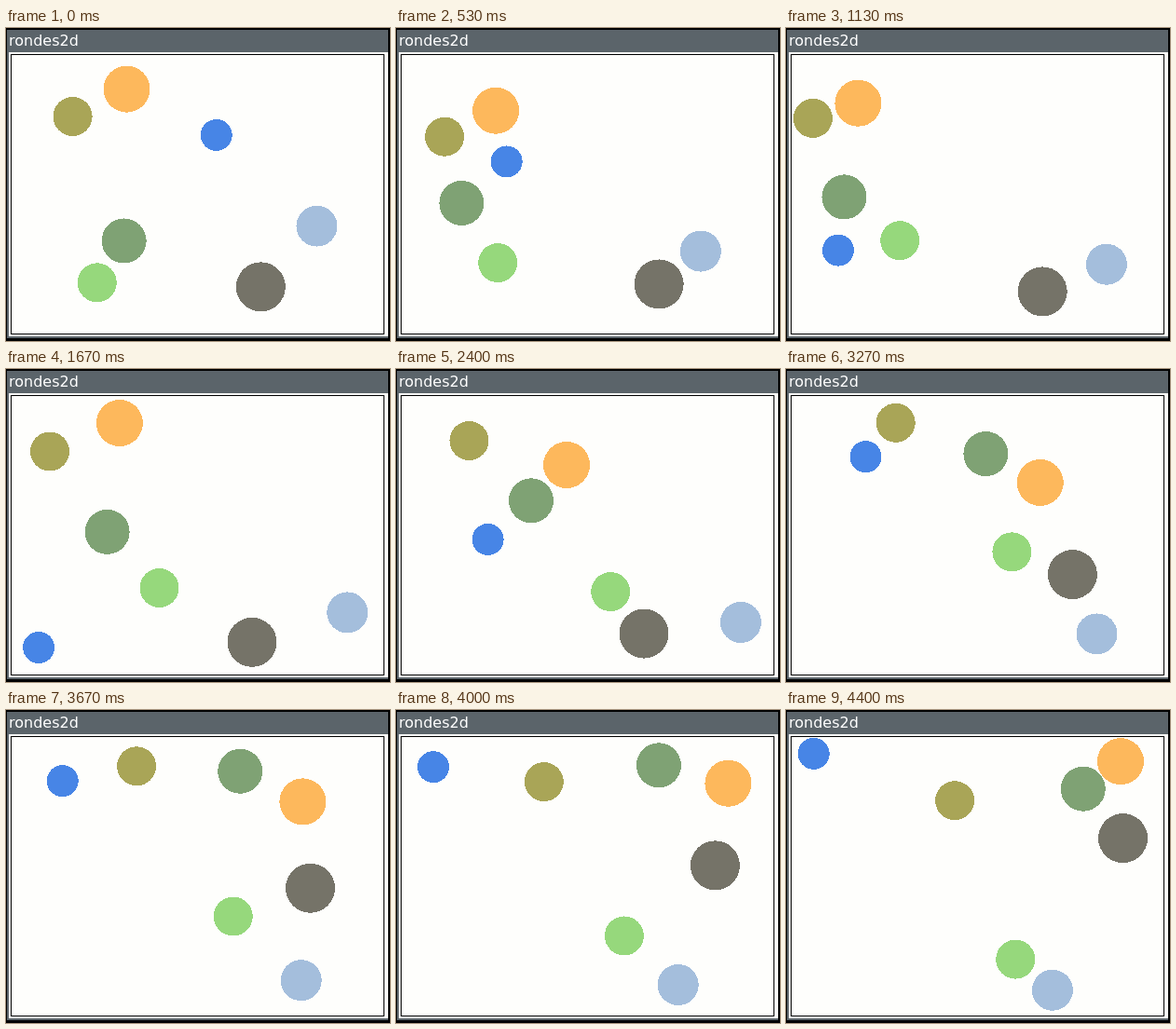
An HTML page for the animation above (4470 ms loop, 412 by 336 pixels).

```html
<!DOCTYPE html>
<html lang="fr">
<head>
<meta charset="utf-8">
<title>rondes2d</title>
<style>
  html, body { margin: 0; width: 100%; height: 100%; overflow: hidden; background: #000; }
  svg { display: block; width: 412px; height: 336px; }
  text { font: 16px "DejaVu Sans", sans-serif; fill: #fff; }
</style>
</head>
<body>
<svg viewBox="0 0 412 336">
  <g shape-rendering="crispEdges">
    <rect width="412" height="336" fill="#000"/>
    <rect x="1" y="2" width="409" height="331" fill="#5b646a"/>
    <rect x="3" y="26" width="407" height="305" fill="#fefefc"/>
    <rect x="5.5" y="28.5" width="400" height="300" fill="none" stroke="#000"/>
  </g>
  <text x="3" y="19">rondes2d</text>
  <g id="balls" shape-rendering="crispEdges"></g>
</svg>
<script>
const LOOP = 4470;
const TICKS = 67;
const SEED_TICK = 25;
const STEPS = 500; // physics steps per tick
const WALL = { left: 5.5, right: 405.5, top: 28, bottom: 328 };

// State at SEED_TICK, in pixels and pixels per tick.
const seed = [
  { r: 25, fill: '#fdb85c', x: 121.9, y: 58, vx: 5.56, vy: 4.09 },
  { r: 21, fill: '#a9a557', x: 47, y: 88.5, vx: 2.86, vy: -1.05 },
  { r: 17, fill: '#4785e6', x: 35.15, y: 299, vx: 5.77, vy: -10.55 },
  { r: 24, fill: '#7fa274', x: 108.6, y: 174.9, vx: 3.31, vy: -3.05 },
  { r: 21, fill: '#96d87c', x: 164.5, y: 235, vx: 8.5, vy: 3.78 },
  { r: 26.5, fill: '#757368', x: 264, y: 293.3, vx: -1.4, vy: 1.3 },
  { r: 22, fill: '#a4bedc', x: 366.3, y: 261.4, vx: 2.8, vy: 0.96 }
];

function bounceOffWalls(b) {
  if (b.x < WALL.left + b.r) b.vx = Math.abs(b.vx);
  if (b.x > WALL.right - b.r) b.vx = -Math.abs(b.vx);
  if (b.y < WALL.top + b.r) b.vy = Math.abs(b.vy);
  if (b.y > WALL.bottom - b.r) b.vy = -Math.abs(b.vy);
}

// Elastic hit between discs whose mass grows with their area.
function collide(a, b) {
  const dx = b.x - a.x, dy = b.y - a.y;
  const dist = Math.hypot(dx, dy);
  if (dist >= a.r + b.r) return;
  const nx = dx / dist, ny = dy / dist;
  const speed = (b.vx - a.vx) * nx + (b.vy - a.vy) * ny;
  if (speed >= 0) return;
  const ma = a.r ** 2, mb = b.r ** 2;
  const push = 2 * speed / (ma + mb);
  a.vx += push * mb * nx;
  a.vy += push * mb * ny;
  b.vx -= push * ma * nx;
  b.vy -= push * ma * ny;
}

function step(balls) {
  for (const b of balls) {
    b.x += b.vx / STEPS;
    b.y += b.vy / STEPS;
    bounceOffWalls(b);
  }
  balls.forEach((a, i) => balls.slice(i + 1).forEach(b => collide(a, b)));
}

// Elastic motion is reversible, so the same rules run both ways from the seed.
const poses = [];
function simulate(dir) {
  const balls = seed.map(b => ({ ...b, vx: b.vx * dir, vy: b.vy * dir }));
  for (let tick = SEED_TICK; tick >= 0 && tick < TICKS; tick += dir) {
    poses[tick] = balls.map(({ x, y }) => ({ x, y }));
    for (let i = 0; i < STEPS; i++) step(balls);
  }
}
simulate(1);
simulate(-1);

const layer = document.getElementById('balls');
const circles = seed.map(({ r, fill }) => {
  const el = document.createElementNS(layer.namespaceURI, 'circle');
  el.setAttribute('r', r);
  el.setAttribute('fill', fill);
  return layer.appendChild(el);
});

// 15 ticks a second, with tick times rounded to 10 ms.
const tickAt = ms => Math.floor((Math.floor(ms / 10) + 0.5) * 0.15);

function draw(ms) {
  const pose = poses[tickAt(ms % LOOP)];
  circles.forEach((el, i) => {
    el.setAttribute('cx', pose[i].x);
    el.setAttribute('cy', pose[i].y);
  });
}

const start = performance.now();
function loop(now) {
  draw(Math.max(0, now - start));
  requestAnimationFrame(loop);
}
draw(0);
requestAnimationFrame(loop);
</script>
</body>
</html>
```
